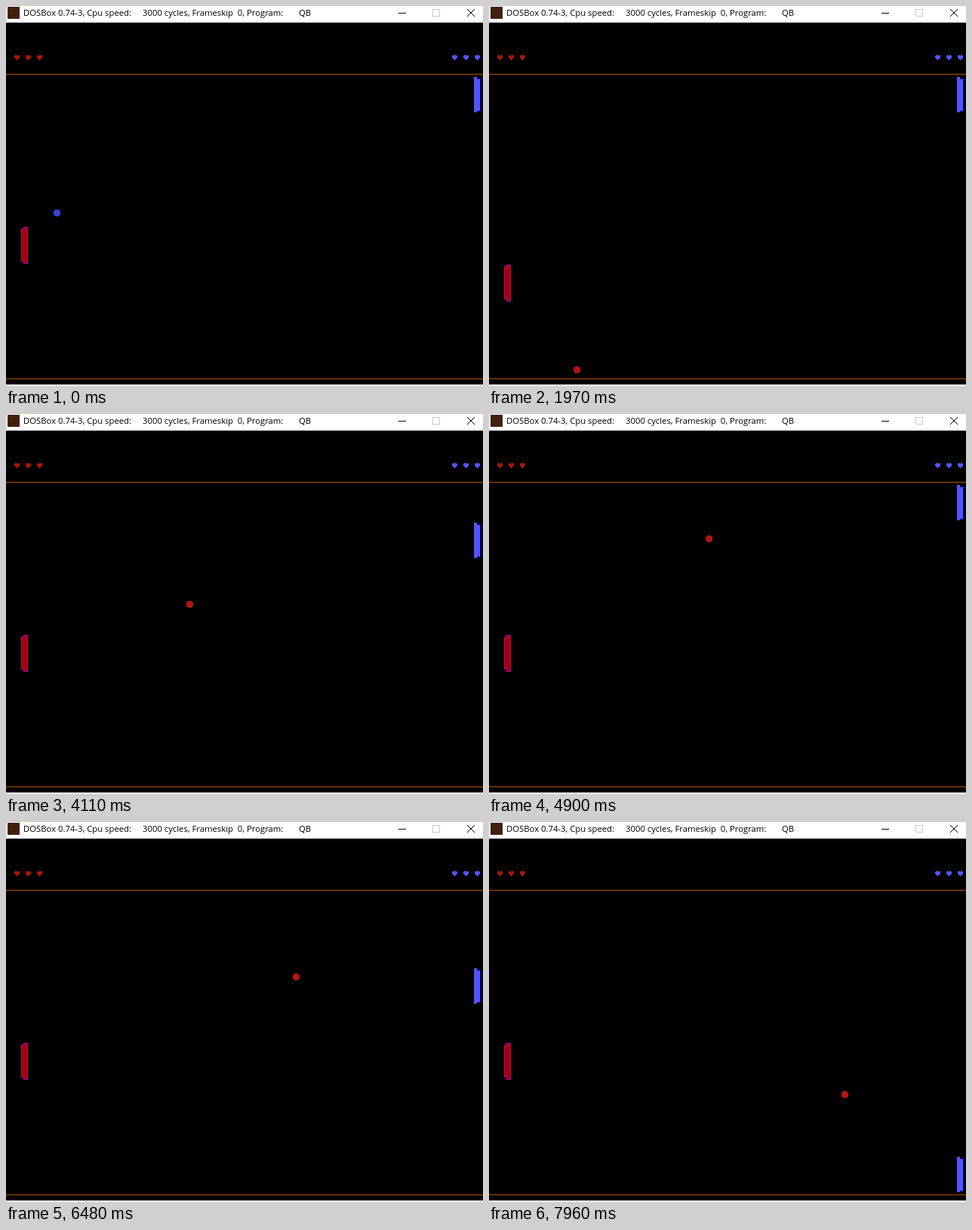
Write an HTML page with a canvas that moves like this. It is 632 px wide and 504 px high and loops after 8000 ms.

```html
<!DOCTYPE html>
<html lang="en">
<head>
<meta charset="utf-8">
<title>Paddle game</title>
<style>
  html, body { margin: 0; width: 100%; height: 100%; overflow: hidden; background: #000; }
  canvas { display: block; }
</style>
</head>
<body>
<canvas id="stage" width="632" height="504"></canvas>
<script>
const ctx = document.getElementById('stage').getContext('2d');
const LOOP = 8000, STEP = 78.8, LAST = 101;
const RED = '#a81800', BLUE = '#5454fc', ORANGE = '#a85400';

// Bounces of the ball: [step, x, y]
const bounces = [
  [0, 67, 274], [7.7, 32.5, 337], [24.6, 114.3, 485],
  [42, 195, 339], [69.35, 326, 101], [LAST, 471, 361]
];

// Paddle rows, 50 px apart: [step, row]
const redRows = [[0, 0], [4, 0], [6, 1], [27, 1], [29, 0], [LAST, 0]];
const blueRows = [[0, 0], [35, 0], [40, 2], [47, 2], [60, 0], [77, 0], [90, 5], [103, 7]];

// Linear value of one column of a track at a step
function sample(track, step, col = 1) {
  const i = Math.max(1, track.findIndex(k => k[0] >= step));
  const a = track[i - 1], b = track[i];
  return a[col] + (b[col] - a[col]) * (step - a[0]) / (b[0] - a[0]);
}

function rect(color, x, y, w, h) {
  ctx.fillStyle = color;
  ctx.fillRect(x, y, w, h);
}

function line(x0, y0, x1, y1) {
  ctx.beginPath();
  ctx.moveTo(x0, y0);
  ctx.lineTo(x1, y1);
  ctx.stroke();
}

function ballColor(step) {
  if (step < bounces[1][0]) return '#3c3cdc';
  return step % 24 === 18 ? '#84005c' : '#b01414';
}

function drawBall(step) {
  const x = Math.round(sample(bounces, step, 1));
  const y = Math.round(sample(bounces, step, 2));
  const color = ballColor(step);
  for (let dy = -4; dy <= 4; dy++) {
    const half = Math.floor(Math.sqrt(20.5 - dy * dy));
    rect(color, x - half, y + dy, half * 2 + 1, 1);
  }
}

function drawHeart(cx, color) {
  rect(color, cx - 2, 65, 2, 1);
  rect(color, cx + 1, 65, 2, 1);
  for (let j = 1; j < 7; j++) {
    const half = Math.min(3, 6 - j);
    rect(color, cx - half, 65 + j, half * 2 + 1, 1);
  }
}

function drawRedPaddle(step) {
  const y = 293 + 50 * Math.round(sample(redRows, step));
  const edge = '#a800a8', fill = '#a80000';
  rect(edge, 20, y + 2, 9, 44);
  rect(edge, 23, y, 6, 49);
  rect(fill, 21, y + 3, 7, 42);
  rect(fill, 24, y + 1, 4, 47);
}

function drawBluePaddle(step) {
  const y = 94 + 50 * Math.round(sample(blueRows, step));
  rect('#0000a8', 624, y + 2, 5, 44);
  rect(BLUE, 624, y + 3, 4, 42);
  rect(BLUE, 620, y, 4, 47);
}

function drawWindow() {
  rect('#fff', 0, 0, 632, 504);
  rect('#000', 0, 22, 632, 480);
  rect('#40200c', 2, 1, 16, 16);

  ctx.fillStyle = '#000';
  ctx.font = '11.3px "Open Sans", "Noto Sans", sans-serif';
  ctx.fillText('DOSBox 0.74-3, Cpu speed:', 23, 13);
  ctx.fillText('3000 cycles, Frameskip  0, Program:', 181, 13);
  ctx.fillText('QB', 388, 13);

  rect('#000', 520, 9, 10, 1);
  ctx.strokeStyle = '#c4ccc4';
  ctx.strokeRect(565.5, 4.5, 9, 9);
  ctx.strokeStyle = '#000';
  line(611, 4, 621, 14);
  line(621, 4, 611, 14);
}

function draw(t) {
  const step = Math.min(LAST, Math.floor(t / STEP + 0.15));
  drawWindow();
  for (let i = 0; i < 3; i++) {
    drawHeart(14 + i * 15, RED);
    drawHeart(594 + i * 15, BLUE);
  }
  rect(ORANGE, 0, 90, 632, 1);
  rect(ORANGE, 0, 494, 632, 1);
  drawRedPaddle(step);
  drawBluePaddle(step);
  drawBall(step);
}

function tick() {
  draw(performance.now() % LOOP);
  requestAnimationFrame(tick);
}
tick();
</script>
</body>
</html>
```
